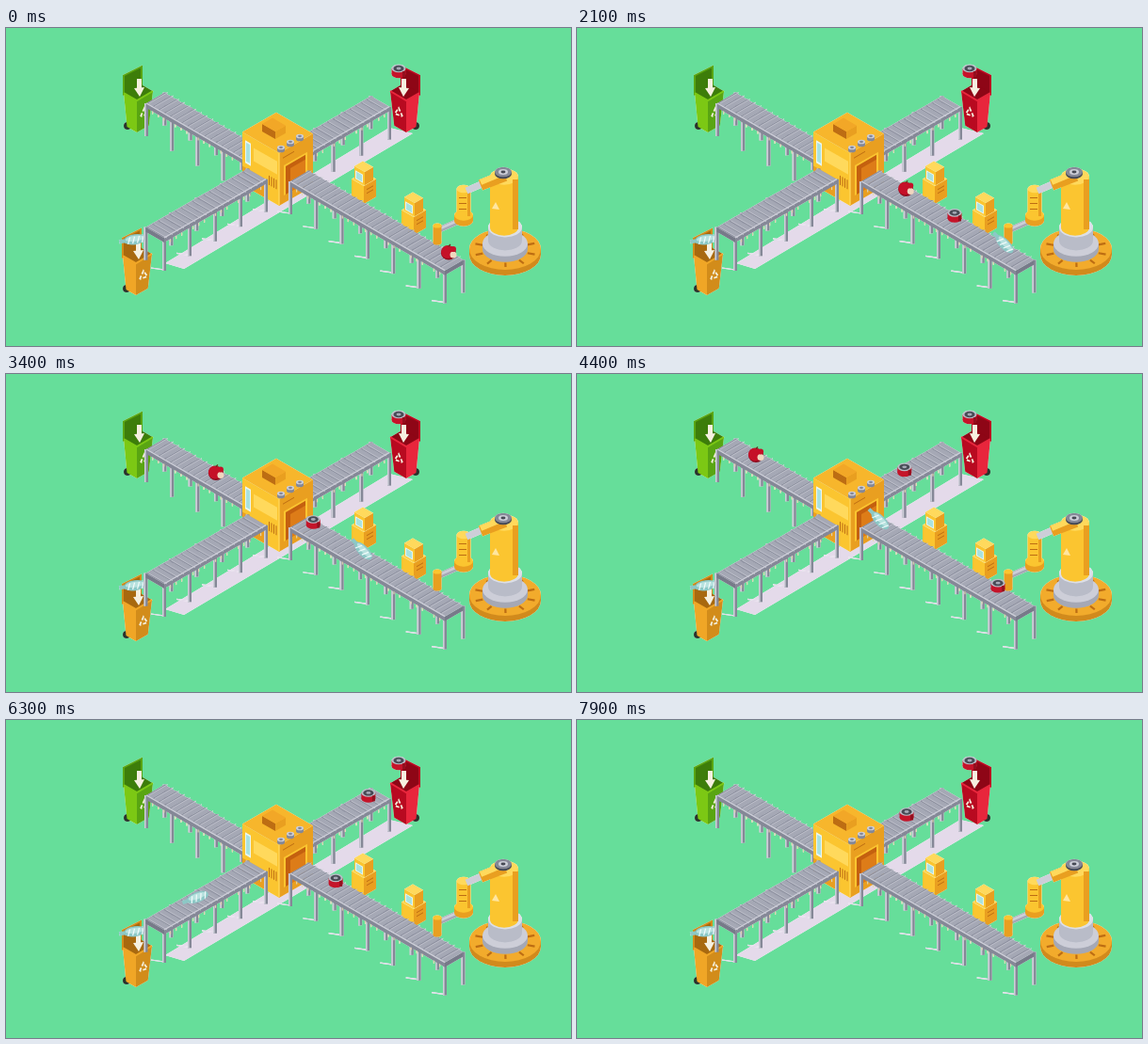
Animation, 600 px wide and 338 px high, one loop 8 s. Source, as an HTML page with a canvas:

```html
<!DOCTYPE html>
<html lang="en">
<head>
<meta charset="utf-8">
<title>Sorting line</title>
<style>
html, body { margin: 0; height: 100%; overflow: hidden; background: #66de9a; }
canvas { display: block; }
</style>
</head>
<body>
<canvas id="stage" width="600" height="338"></canvas>
<script>
const LOOP = 8000, STEP = 100;
const K = Math.tan(Math.PI / 6); // isometric slope
const GOLD = '#fbc530', LIGHT = '#ffd95c', AMBER = '#e99f20', BROWN = '#bd6d13';
const STEEL = '#a5a8b5', PALE = '#cdced8', SLATE = '#858897', SHADE = '#e4daea';
const GLASS = '#a9e2df', DARK = '#474a55';
let c = document.getElementById('stage').getContext('2d');

function trace(p) {
  c.beginPath();
  for (let i = 0; i < p.length; i += 2) c.lineTo(p[i], p[i + 1]);
}
function poly(color, ...p) {
  trace(p);
  c.fillStyle = color;
  c.fill();
}
function line(color, width, ...p) {
  trace(p);
  c.strokeStyle = color;
  c.lineWidth = width;
  c.stroke();
}
function rect(color, x, y, w, h) {
  c.fillStyle = color;
  c.fillRect(x, y, w, h);
}
function oval(color, x, y, rx, ry = rx * K) {
  c.fillStyle = color;
  c.beginPath();
  c.ellipse(x, y, rx, ry, 0, 0, 7);
  c.fill();
}
function cylinder(side, top, x, y, r, h) {
  oval(side, x, y + h, r);
  rect(side, x - r, y, 2 * r, h);
  oval(top, x, y, r);
}
function at(x, y, draw, flip = 1) {
  c.save();
  c.translate(x, y);
  c.scale(flip, 1);
  draw();
  c.restore();
}
// draws on an upright wall that runs along the given slope
function wall(x, y, slope, draw) {
  c.save();
  c.transform(1, slope, 0, 1, x, y);
  draw();
  c.restore();
}
// box with its front bottom corner at x, y, reaching a to the left and b to the right
function box(x, y, a, b, h, [left, right, top], taper = 1) {
  const l = a * taper, r = b * taper, up = y - h;
  poly(left, x, y, x - l, y - l * K, x - a, up - a * K, x, up);
  poly(right, x, y, x + r, y - r * K, x + b, up - b * K, x, up);
  poly(top, x, up, x - a, up - a * K, x + b - a, up - (a + b) * K, x + b, up - b * K);
}

function leg(x, y) {
  rect(SLATE, x - 2, y, 4, 35);
  rect(PALE, x - 2, y, 1.6, 35);
}
// near edge starts at x, y; dir 1 runs down to the right, -1 up to the right
function belt(x, y, run, dir, shadows) {
  const w = 19.5 * dir, depth = -19.5 * K, slope = dir * K;
  const legs = Math.round(run / 27), rollers = Math.round(run / 6);
  for (let i = 0; i <= legs; i++) {
    const px = x + run * i / legs, py = y + run * i / legs * slope;
    if (shadows) line(SHADE, 1.2, px, py + 34, px - 14, py + 32);
    leg(px + w, py + depth);
    leg(px, py);
  }
  wall(x, y, slope, () => rect(SLATE, 0, 0, run, 5));
  const end = dir > 0 ? run : 0;
  wall(x + end, y + end * slope, -slope, () => rect('#777a89', Math.min(w, 0), 0, 19.5, 5));
  for (let i = 0; i < rollers; i++) {
    const s = run / rollers, px = x + s * i, py = y + s * i * slope;
    poly(STEEL, px, py, px + s, py + s * slope, px + s + w, py + s * slope + depth, px + w, py + depth);
    line('#8f92a1', 1.3, px + 1, py, px + 1 + w, py + depth);
    line('#bcbec9', 1, px + 3, py, px + 3 + w, py + depth);
    if (i % 4) rect('#dfd2ae', px, py + 5, 1.2, 3);
  }
  line(PALE, 1.3, x, y, x + run, y + run * slope);
}

function bin(left, right, dark) {
  oval('#27342c', 5, 64, 4, 4);
  wall(0, 10, -.5, () => {
    rect(right, 0, 0, 21, 22);
    rect(dark, 2, 2, 17, 18);
  });
  box(15, 71, 14, 17, 34, [left, right, dark], .75);
  line(left, 2, 1, 29, 15, 37, 32, 27);
  c.setLineDash([4, 2]);
  line('#f4f0dd', 1.8, 19, 54, 23, 45, 27, 51, 19, 54);
  c.setLineDash([]);
  rect('#f6f0e0', 15, 14, 5, 12);
  poly('#f6f0e0', 12, 24, 23, 23, 18, 33);
}

function apple() {
  oval('#8d0a1c', 0, 1, 8, 7.5);
  oval('#c51028', -1, 0, 7, 7);
  oval('#f0d6bf', 5, 3, 3.5, 3.5);
  oval('#c51028', 5, -3, 3, 3);
  line('#64301c', 1.3, 0, -6, 2, -8);
}
function can() {
  cylinder('#c5142a', '#b9bcc6', 0, -3, 7.5, 6);
  rect('#94101f', 4, 0, 3, 6);
  oval(DARK, 0, -3, 5.5);
  oval(STEEL, 0, -3, 2.5);
}
function bottle(turn) {
  c.save();
  c.rotate(turn);
  oval('#8cc8c6', 2, 0, 12, 5.5);
  rect('#8cc8c6', -15, -2, 7, 4);
  oval('#b8e2df', 2, -1, 10, 3);
  for (let x = -6; x < 12; x += 5) line('#f0fafa', 1.2, x, 4, x + 3, -3);
  c.restore();
}

function kiosk() {
  box(13, 46, 13, 13, 19, [GOLD, AMBER, LIGHT]);
  box(14, 26, 11, 9, 14, [GOLD, AMBER, LIGHT]);
  wall(14, 26, K, () => {
    rect('#e9f5ef', -10, -10, 8, 9);
    rect(GLASS, -9, -9, 6, 7);
  });
  wall(13, 46, -K, () => {
    for (const y of [-14, -10]) rect(BROWN, 3, y, 7, 1);
  });
}

function machine() {
  box(290, 189, 39, 36, 56, [GOLD, AMBER, '#f7b62c']);
  box(286, 118, 14, 11, 8, [BROWN, AMBER, '#f2a727']);
  for (let i = 0; i < 3; i++) {
    cylinder(SLATE, PALE, 292 + 10 * i, 127 - 6 * i, 4, 3);
    oval(SLATE, 292 + 10 * i, 127 - 6 * i, 2);
  }
  wall(290, 189, K, () => {
    rect('#eaf6f1', -36, -49, 6, 24);
    rect(GLASS, -35, -47, 4, 20);
    rect(AMBER, -39, -20, 27, 20);
    rect(LIGHT, -27, -46, 25, 14);
    for (let x = -11; x < -2; x += 2.5) rect(BROWN, x, -26, 1, 10);
  });
  wall(290, 189, -K, () => {
    rect(GOLD, 5, -40, 25, 32);
    rect('#c4600f', 7, -38, 21, 30);
    rect('#dd7c18', 12, -33, 16, 25);
    rect(BROWN, 4, -49, 12, 1);
  });
  line(LIGHT, 1.3, 290, 133, 290, 188);
}

function robot() {
  cylinder('#d18a1c', '#f2ab2c', 530, 235, 38, 6);
  for (let a = .3; a < 6.5; a += Math.PI / 5) {
    const x = Math.cos(a), y = Math.sin(a) * K;
    line(BROWN, 2.2, 530 + 25 * x, 235 + 25 * y, 530 + 33 * x, 235 + 33 * y);
  }
  cylinder(STEEL, PALE, 530, 229, 24, 6);
  cylinder('#b9bcc8', '#dddfe6', 530, 212, 18, 14);

  line(STEEL, 6, 486, 203, 461, 214);
  line(PALE, 3, 486, 202, 461, 213);
  cylinder(AMBER, GOLD, 458, 210, 4.5, 18);
  cylinder(AMBER, GOLD, 486, 199, 10, 6);
  cylinder(GOLD, LIGHT, 486, 171, 7.5, 29);
  rect(AMBER, 490, 174, 3, 26);
  for (let y = 180; y < 198; y += 6) rect(BROWN, 481, y, 8, 1);

  cylinder(GOLD, LIGHT, 529, 158, 15, 54);
  rect(AMBER, 538, 161, 6, 53);
  poly('#ffe6a0', 516, 192, 520, 185, 524, 193);
  line(PALE, 7, 489, 173, 512, 163);
  line(AMBER, 12, 504, 167, 530, 157);
  line(LIGHT, 6, 504, 164, 528, 154);
  cylinder(DARK, SLATE, 528, 153, 9, 2);
  oval(PALE, 528, 153, 5);
  oval(DARK, 528, 153, 2.5);
}

function backdrop() {
  poly(SHADE, 169, 250, 189, 256, 432, 112, 407, 106);
  at(124, 40, () => bin('#7cc814', '#59a512', '#3d7d0a'));
  at(440, 40, () => bin('#e8263c', '#b80a20', '#8e0616'), -1);
  at(417, 46, can);
  belt(149, 80, 109, 1);
  belt(318, 135, 89, -1);
}
function foreground() {
  machine();
  at(123, 213, () => bin('#f0a626', '#d28c1a', '#a8690f'));
  at(135, 225, () => bottle(-.15));
  belt(168, 223, 108, -1, true);
  at(367, 141, kiosk);
  at(420, 174, kiosk);
  belt(302, 163, 164, 1, true);
  robot();
}

// ways out of the machine: first point, direction, slowing pace, length
const toGreen = { x: 262, y: 127, dx: -1, dy: -K, pace: 55, reach: 110 };
const toRed = { x: 318, y: 119, dx: 1, dy: -K, pace: 38, reach: 74 };
const toOrange = { x: 264, y: 153, dx: -1, dy: K, pace: 46, reach: 91, front: true };
const items = [
  { draw: apple, start: 0, speed: 57.5, out: toGreen },
  { draw: can, start: 900, speed: 57.5, out: toRed },
  { draw: bottle, start: 1800, speed: 57.5, out: toOrange },
  { draw: can, start: 3950, speed: 51, out: toRed }
];
const INLET = 163;

function place(item, t) {
  const s = (t - item.start) / 1000, done = INLET / item.speed, { out } = item;
  if (s < 0) return;
  if (s < done) {
    const d = s * item.speed;
    return { x: 470 - d, y: 238 - d * .56, turn: .8, front: true };
  }
  const d = out.pace * (s - done) ** .6;
  if (d < out.reach) return { x: out.x + out.dx * d, y: out.y + out.dy * d, turn: -.35, front: out.front };
}
function drawItems(t, front) {
  for (const item of items) {
    const p = place(item, t);
    if (p && !p.front === !front) at(p.x, p.y, () => item.draw(p.turn));
  }
}

// paints once, then adds a thin pale rim
function layer(draw) {
  const make = () => Object.assign(document.createElement('canvas'), { width: 600, height: 338 });
  const stage = c, plain = make(), rimmed = make();
  c = plain.getContext('2d');
  draw();
  c = rimmed.getContext('2d');
  c.filter = 'drop-shadow(0 0 .6px #fff)';
  c.drawImage(plain, 0, 0);
  c = stage;
  return rimmed;
}
const back = layer(backdrop), front = layer(foreground);

function frame(now) {
  const t = Math.floor(now % LOOP / STEP) * STEP;
  rect('#66de9a', 0, 0, 600, 338);
  c.drawImage(back, 0, 0);
  drawItems(t, false);
  c.drawImage(front, 0, 0);
  drawItems(t, true);
  requestAnimationFrame(frame);
}
requestAnimationFrame(frame);
</script>
</body>
</html>
```
